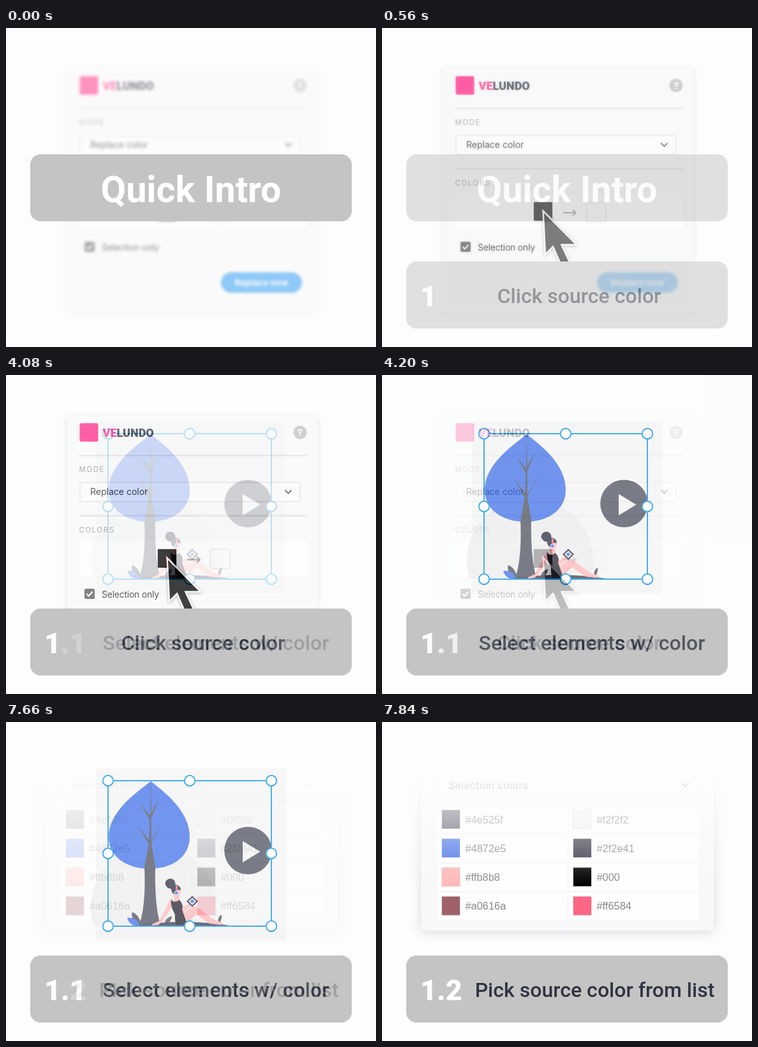
An HTML page that plays this animation: 580 px wide and 500 px high, repeating every 8 s.

```html
<!DOCTYPE html>
<html lang="en">
<head>
<meta charset="utf-8">
<title>Quick Intro</title>
<style>
  html, body { margin: 0; width: 100%; height: 100%; overflow: hidden; background: #fdfdfd; }
  svg { display: block; width: 580px; height: 500px; font-family: Inter, sans-serif; }
  .roboto { font-family: Roboto, sans-serif; }
  .label { font-size: 11.5px; letter-spacing: 1.5px; fill: #98999b; }
  .field { font-size: 14px; fill: #2a2a2a; }
  .hex { font: 16.4px "Liberation Sans", Arial, sans-serif; fill: #868686; }
  .panel { filter: drop-shadow(0 1px 4px rgba(70, 80, 90, .16)); }
  .list { filter: drop-shadow(0 2px 9px rgba(70, 70, 100, .2)); }
  .intro { filter: blur(2px); opacity: .5; }
  .cursor { filter: drop-shadow(0 1px 2px rgba(0, 0, 0, .4)); }
</style>
</head>
<body>
<svg id="stage" viewBox="0 0 580 500"></svg>
<script>
const stage = document.getElementById('stage');
const LOOP = 8000, STEP = 60, FADES = [500, 4080, 7660];

const bar = y => `<rect x="38" y="${y}" width="504" height="105" rx="16" fill="#c4c4c4"/>`;
const caption = (num, text, cx) => `${bar(366)}<g class="roboto">
  <text x="60" y="435.5" font-size="45" font-weight="900" fill="#fff">${num}</text>
  <text x="${cx}" y="431" font-size="32" font-weight="500" fill="#2f3440" text-anchor="middle">${text}</text></g>`;
const chevron = (x, y) =>
  `<path d="M${x} ${y}l4.5 4.5 4.5-4.5" fill="none" stroke="#555" stroke-width="2" stroke-linecap="round"/>`;
const divider = y => `<path d="M115 ${y}H472" stroke="#e2e3e4" stroke-width="2.5"/>`;

const panel = `
  <rect class="panel" x="96" y="64" width="392" height="384" fill="#f8f9f9"/>
  <rect x="115.5" y="75.5" width="29" height="29" rx="3" fill="#ff2a86"/>
  <text class="roboto" x="151.5" y="97" font-size="18" font-weight="900" fill="#2f3440"><tspan fill="#ff2a86">VE</tspan>LUNDO</text>
  <circle cx="461" cy="90" r="10.5" fill="#c2c2c2"/>
  <text x="461" y="95.5" font-size="15" font-weight="700" fill="#fff" text-anchor="middle">?</text>
  ${divider(126.2)}${divider(220.5)}
  <text class="label" x="114.5" y="152">MODE</text>
  <text class="label" x="114.5" y="247">COLORS</text>
  <rect x="116" y="168.5" width="344.5" height="30" rx="3" fill="#fcfcfc" stroke="#dfe0e0" stroke-width="1.5"/>
  <text class="field" x="132" y="188">Replace color</text>
  ${chevron(438, 181)}
  <rect x="115" y="261.5" width="357" height="53" fill="#fdfdfd"/>
  <rect x="237.5" y="272.5" width="30" height="30" rx="2" stroke="#ddd"/>
  <path d="M284 289.5H303M299 285l5 4.5-5 4.5" fill="none" stroke="#949494" stroke-width="2"/>
  <rect x="320.5" y="273" width="30.5" height="30.5" rx="3" fill="#fbfbfb" stroke="#e3e3e3" stroke-width="1.5"/>
  <rect x="123" y="335" width="16" height="16" rx="2" fill="#5c5c5c"/>
  <path d="M126.5 343l3.2 3.2 6-6.4" fill="none" stroke="#fff" stroke-width="2"/>
  <text class="field" x="150" y="348.5" fill="#444" letter-spacing="-.25">Selection only</text>
  <rect x="337" y="383" width="127" height="32" rx="16" fill="#2196f3"/>
  <text x="400.5" y="403.5" font-size="13.5" font-weight="700" fill="#fff" text-anchor="middle">Replace now</text>`;

const cursor = `<path class="cursor" d="M254 290L257 352 268.500 340.500 283 374H296L279.500 338.500H302Z"
  stroke="#fff" stroke-width="5" paint-order="stroke"/>`;

const handles = [92, 206, 320].flatMap(y => [160, 288, 416].map(x =>
  x === 288 && y === 206 ? '' : `<circle cx="${x}" cy="${y}" r="8.200"/>`)).join('');

const drawing = `
  <rect x="141" y="73" width="298" height="270" fill="#f6f5f6"/>
  <path d="M137 319A99 99 0 1 1 327 319Z" fill="#efeeef"/>
  <path d="M227 93C205 110 161 140 161 180C161 212 190 230 225 230S288 212 288 180C288 140 249 110 227 93Z" fill="#4373ea"/>
  <g fill="#4e525f">
    <path d="M227 96L228 190 234 228C233 270 237 305 243 319H208C215 305 219 270 217 228L224 190Z"/>
    <path d="M225.500 154L210 127 228 150 240 121 228 142ZM225 194L207 162 227 189 247 155 228 190Z"/>
    <circle cx="379.500" cy="201.500" r="37.300"/>
    <path d="M211 318C200 313 195 305 198 298C206 301 211 309 211 318ZM249 318Q248 308 260 304Q260 313 249 318ZM333 314Q331 306 338 302Q339 309 335 315Z"/>
  </g>
  <path d="M371 186.500V220L398.500 203.200Z" fill="#f4f4f4"/>
  <path d="M209 319C199 321 192 315 190 307C200 306 208 311 209 319Z" fill="#4373ea"/>
  <path d="M200 319.500Q275 307 354 319.500Z" fill="#3f3d4f"/>
  <g fill="#ffb8b8">
    <path d="M258 277C263 277 262 285 259 292L245 312 239 318 228 319 229 317 240 312 252 289Z"/>
    <path d="M262 268H271L272 279 278 290 290 283 293 286 278 298 264 282Z"/>
    <path d="M272 304L290 291Q297 287 302 292L325 309 340 315 337 318 319 316 298 301 283 317H270Z"/>
    <ellipse cx="268" cy="265" rx="6" ry="7"/>
  </g>
  <path d="M296 298L281 317" stroke="#f1a3a6"/>
  <path d="M259 278Q263 285 272 279Q279 287 276 294L283 314 278 318H267Q264 310 265 302Q257 288 259 278Z" fill="#25232f"/>
  <g fill="#2f2e41">
    <circle cx="257.500" cy="253.500" r="8"/>
    <path d="M259 262C259 252 274 253 274 264Q268 260 266 270Q259 269 259 262Z"/>
  </g>
  <path d="M250 256Q251 261 257 262" fill="none" stroke="#f6f5f6" stroke-width="1.500"/>
  <path d="M267.500 256V267" stroke="#ff6584" stroke-width="3"/>
  <circle cx="267" cy="268" r="3" fill="#4373ea" stroke="#eee"/>
  <path d="M292 272.500L301 281 292 290 283 281Z" fill="#2f2e41"/>
  <path d="M292 275.500L298 281 292 287 286 281Z" fill="#f4f4f4"/>
  <circle cx="292" cy="281" r="2.800" fill="#4373ea"/>
  <g fill="#fff" stroke="#1094e2" stroke-width="2"><rect x="160" y="92" width="256" height="228" fill="none"/>${handles}</g>`;

const swatches = ['4e525f', 'f2f2f2', '4872e5', '2f2e41', 'ffb8b8', '000', 'a0616a', 'ff6584'].map((hex, i) => {
  const x = 87 + i % 2 * 206, y = 132 + (i >> 1) * 45.2;
  return `<rect x="${x}" y="${y}" width="203" height="41.500" fill="#fefefe"/>
    <rect x="${x + 6.5}" y="${y + 5.5}" width="29" height="30" fill="#${hex}" stroke="#e2e2e2"/>
    <text class="hex" x="${x + 43.5}" y="${y + 26.5}">#${hex}</text>`;
}).join('');

const list = `
  <rect class="list" x="61" y="60" width="459" height="267" fill="#f8f8fa"/>
  <rect x="85.500" y="80" width="409" height="36" rx="3" fill="#fdfdfd" stroke="#ddd"/>
  <text x="104" y="104.500" font-size="16.500" fill="#444">Selection colors</text>
  ${chevron(471, 96.5)}${swatches}
  <rect y="30" width="580" height="226" fill="url(#veil)"/>`;

const scenes = [
  `<g class="intro">${panel}</g>${bar(198)}
   <text class="roboto" x="290" y="273" font-size="57.500" font-weight="700" fill="#fff" text-anchor="middle">Quick Intro</text>`,
  panel + cursor + caption('1', 'Click source color', 309),
  drawing + caption('1.1', 'Select elements w/ color', 329),
  list + caption('1.2', 'Pick source color from list', 333.5)
];

stage.innerHTML = `<defs><linearGradient id="veil" gradientUnits="userSpaceOnUse" x1="0" y1="73" x2="0" y2="256">
  <stop stop-color="#fdfdfd"/><stop offset="1" stop-color="#fdfdfd" stop-opacity="0"/></linearGradient></defs>` +
  scenes.map(s => `<g class="scene"><rect width="580" height="500" fill="#fdfdfd"/>${s}</g>`).join('');
const layers = stage.querySelectorAll('.scene');

// Each scene fades in over the one before it in four hard steps.
function draw(now) {
  const t = now % LOOP;
  FADES.forEach((start, i) => {
    const step = Math.floor((t - start) / STEP) + 1;
    layers[i + 1].style.opacity = Math.min(4, Math.max(0, step)) / 4;
  });
  requestAnimationFrame(draw);
}
draw(performance.now());
</script>
</body>
</html>
```
